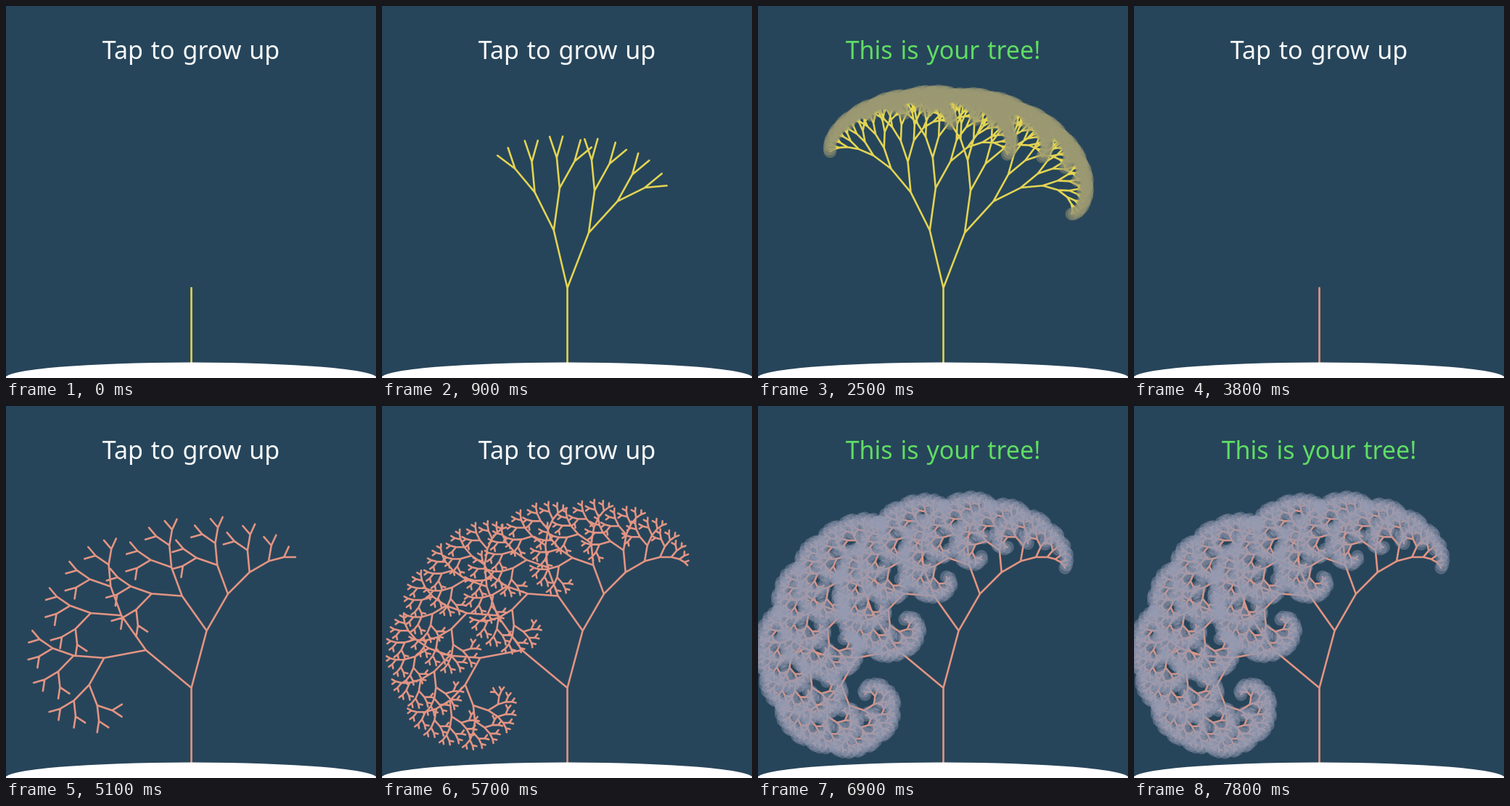
These frames come from a looping animation (510x512 px, 8 s). An HTML page with a canvas:

```html
<!DOCTYPE html>
<html lang="en">
<head>
<meta charset="utf-8">
<title>Tap to grow up</title>
<style>
  html, body { margin: 0; width: 510px; height: 512px; overflow: hidden; background: #27455a; }
  canvas { display: block; }
  h1 {
    position: absolute; left: 0; top: 43px; width: 510px; margin: 0;
    font: 400 34px/34px "Noto Sans", "Open Sans", sans-serif;
    word-spacing: 2px; text-align: center; white-space: pre;
  }
</style>
</head>
<body>
<canvas id="stage" width="510" height="512"></canvas>
<h1 id="label"></h1>
<script>
const ctx = document.getElementById('stage').getContext('2d');
const label = document.getElementById('label');

const LOOP = 8000, RESET = 3500, TAP = 200, LEAF_TIME = 2000;
const RATIO = 0.72, FIRST = 81.4, LEAF = 8.9;
const RAD = Math.PI / 180;

const trees = [
  { start: 100, levels: 9, left: -13.3, right: 21.2, bark: '#e3d453', leaf: 'rgba(156,153,115,.45)' },
  { start: 3800, levels: 10, left: -50.3, right: 15, bark: '#e39483', leaf: 'rgba(149,156,178,.4)' }
];

// Adds both children of a node to the path and collects the outermost tips.
function grow(tree, x, y, angle, length, depth, tips) {
  if (!depth) {
    tips.push([x, y]);
    return;
  }
  for (const turn of [tree.left, tree.right]) {
    const a = angle + turn;
    const nx = x + length * Math.sin(a * RAD);
    const ny = y - length * Math.cos(a * RAD);
    ctx.moveTo(x, y);
    ctx.lineTo(nx, ny);
    grow(tree, nx, ny, a, length * RATIO, depth - 1, tips);
  }
}

function draw(t) {
  const tree = trees[t < RESET ? 0 : 1];
  const age = Math.max(0, t - tree.start);
  const depth = Math.min(tree.levels, Math.floor(age / TAP));
  const done = age >= LEAF_TIME;
  const tips = [];

  ctx.fillStyle = '#27455a';
  ctx.fillRect(0, 0, 510, 512);

  ctx.strokeStyle = tree.bark;
  ctx.lineWidth = 2.6;
  ctx.lineCap = 'round';
  ctx.beginPath();
  ctx.moveTo(255.5, 501);
  ctx.lineTo(255.5, 388);
  grow(tree, 255.5, 388, 0, FIRST, depth, tips);
  ctx.stroke();

  if (done) {
    ctx.fillStyle = tree.leaf;
    for (const [x, y] of tips) {
      ctx.beginPath();
      ctx.arc(x, y, LEAF, 0, 2 * Math.PI);
      ctx.fill();
    }
  }

  ctx.fillStyle = '#fff';
  ctx.beginPath();
  ctx.ellipse(255, 512, 256, 21.4, 0, 0, 2 * Math.PI);
  ctx.fill();

  label.textContent = done ? 'This is your tree!' : 'Tap to grow up';
  label.style.color = done ? '#5fdc64' : '#f7f9fa';
}

const begin = performance.now();
function frame() {
  draw((performance.now() - begin) % LOOP);
  requestAnimationFrame(frame);
}
frame();
</script>
</body>
</html>
```
